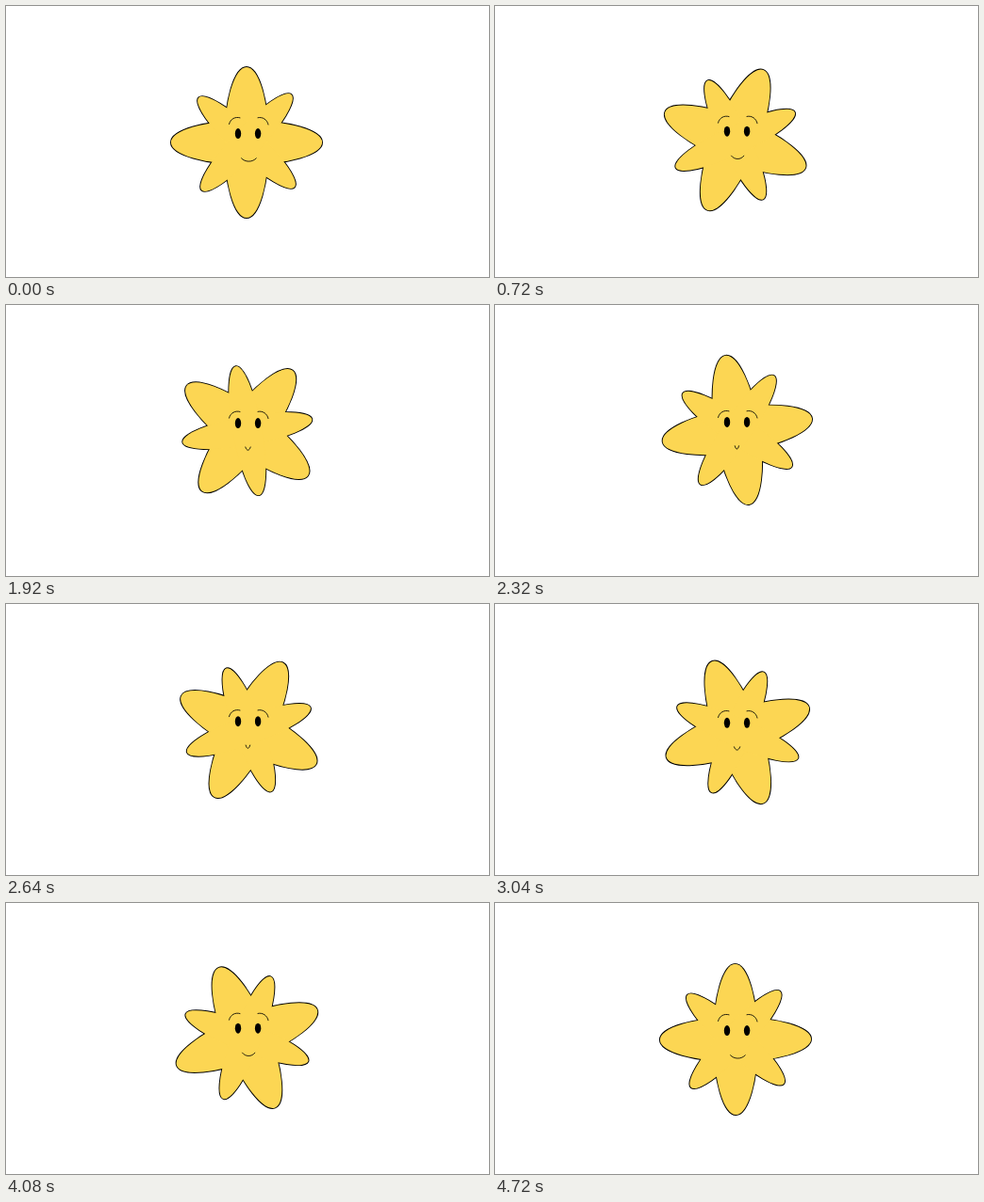
An HTML page for the animation above (4.8 s loop, 512x288 px).

```html
<!DOCTYPE html>
<html lang="en">
<head>
<meta charset="utf-8">
<title>Spinning star</title>
<style>
  html, body { margin: 0; width: 100%; height: 100%; overflow: hidden; background: #fff; }
  svg { display: block; width: 100vw; height: 100vh; }
  .line { fill: none; stroke: #000; stroke-width: .85; stroke-linecap: round; }
</style>
</head>
<body>
<svg viewBox="0 0 512 288">
  <defs>
    <g id="petals">
      <ellipse rx="80.1" ry="23.4"/>
      <ellipse rx="80.1" ry="23.4" transform="rotate(90)"/>
      <ellipse rx="69.6" ry="15.4" transform="rotate(43.1)"/>
      <ellipse rx="69.6" ry="15.4" transform="rotate(133.1)"/>
    </g>
  </defs>
  <g id="star">
    <use href="#petals" fill="#000" stroke="#000" stroke-width="1.8"/>
    <use href="#petals" fill="#fcd653"/>
  </g>
  <g id="brows" class="line">
    <path d="M236.5 125.5C238 119.8 243 117.4 248 118.8"/>
    <path d="M267 118.7C272 117.5 277 120.8 278 126"/>
  </g>
  <g id="eyes">
    <ellipse cx="246" cy="135.6" rx="3.2" ry="5.5"/>
    <ellipse cx="267.1" cy="135.6" rx="3.2" ry="5.5"/>
  </g>
  <path id="mouth" class="line"/>
</svg>
<script>
  const LOOP = 4800, STEP = 80;
  const [star, brows, eyes, mouth] =
    ["star", "brows", "eyes", "mouth"].map(id => document.getElementById(id));

  const ease = u => u * u * (3 - 2 * u);
  const mix = (a, b, u) => a + (b - a) * u;
  const lift = (el, dy) => el.setAttribute("transform", `translate(0 ${-dy})`);

  function draw(ms) {
    const t = Math.floor(ms % LOOP / STEP) * STEP / LOOP;
    const turn = 360 * ease(t);
    const up = ease(1 - Math.abs(1 - 2 * t)); // rises to mid-loop, then falls

    // the star spins about a point slightly off its own centre
    star.setAttribute("transform",
      `translate(256 ${144 - 10 * up}) rotate(${turn}) translate(-1 1)`);
    lift(brows, 6 * up);
    lift(eyes, 11.2 * up);

    const x = mix(257.4, 256.4, up), y = mix(161.8, 149.7, up), w = mix(7.9, 2.1, up);
    mouth.setAttribute("d",
      `M${x - w} ${y}C${x - w / 2} ${y + 4.5} ${x + w / 2} ${y + 4.5} ${x + w} ${y}`);
  }

  const start = performance.now();
  function tick() {
    draw(performance.now() - start);
    requestAnimationFrame(tick);
  }
  tick();
</script>
</body>
</html>
```
